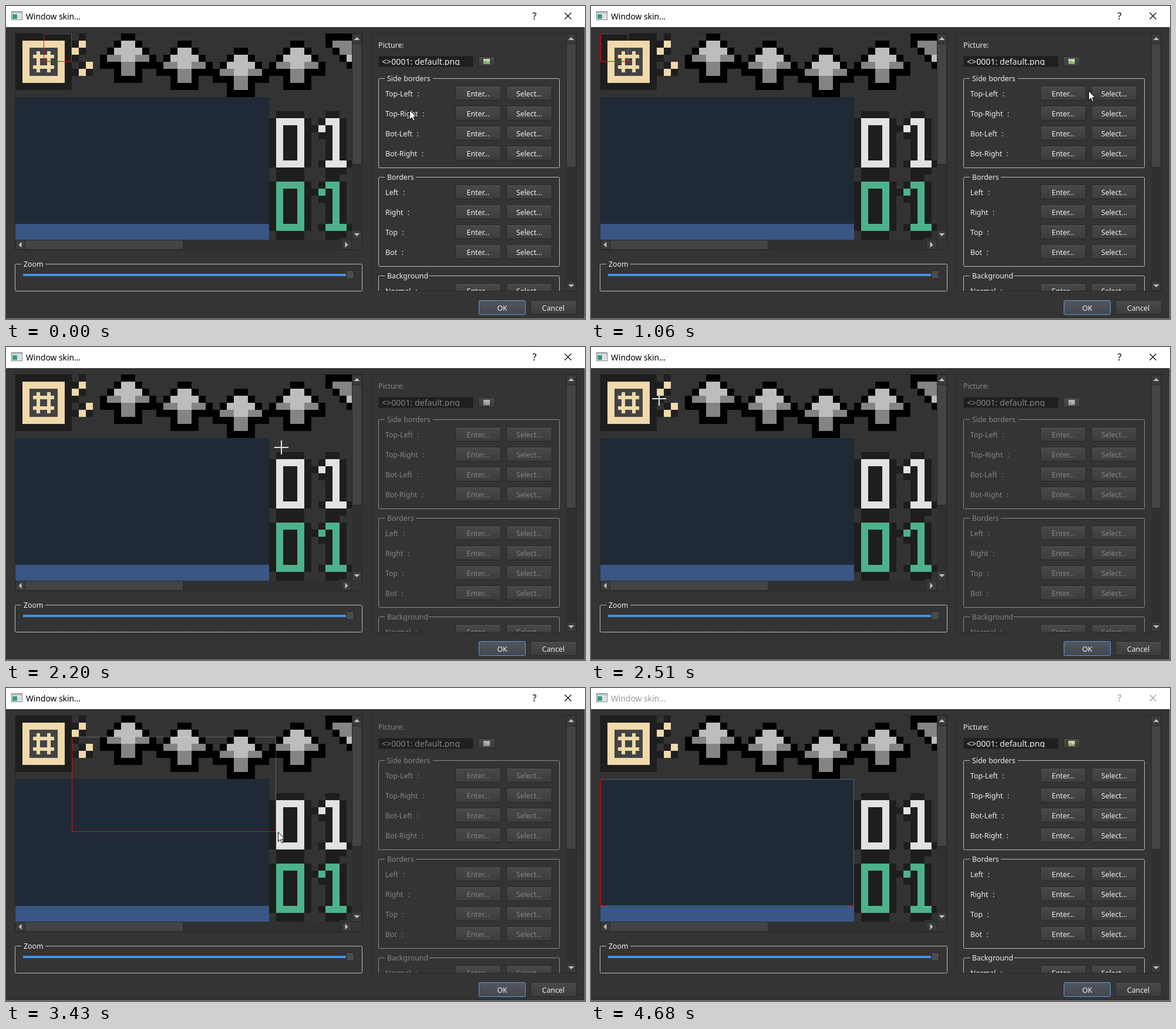
An HTML page for the animation above (4.74 s loop, 986 px wide and 533 px high).

```html
<!DOCTYPE html>
<html lang="en">
<head>
<meta charset="utf-8">
<title>Window skin</title>
<style>
html, body { margin: 0; width: 100%; height: 100%; overflow: hidden; background: #333; }
svg { display: block; width: 986px; height: 533px; }
text { font: 12.3px "Noto Sans", "Open Sans", sans-serif; fill: #f0f0f0; white-space: pre; word-spacing: .6px; }
.mid { text-anchor: middle; }
.box { fill: none; stroke: #bcbcbc; }
.off text { fill: #858585; }
.off .box { stroke: #8c8c8c; }
.off .leaf { fill: #b4b4b4; }
.off .land { fill: #9a9a9a; }
.leaf { fill: #c3dab0; }
.land { fill: #86ab72; }
#caption text { fill: #000; }
#caption path { stroke: #000; fill: none; }
#caption.idle text { fill: #999; }
#caption.idle path { stroke: #999; }
</style>
</head>
<body>
<svg id="stage" viewBox="0 0 986 533" xmlns="http://www.w3.org/2000/svg"></svg>
<script>
const LOOP = 4740, CELL = 12, DARK = '#1e1e1e';

const rect = (x, y, w, h, fill, more = '') =>
  `<rect x="${x}" y="${y}" width="${w}" height="${h}" fill="${fill}" ${more}/>`;
const label = (x, y, s, more = '') => `<text x="${x}" y="${y}" ${more}>${s}</text>`;
const frame = (x, y, w, h, fill, line, more = '') =>
  rect(x + .5, y + .5, w - 1, h - 1, fill, `stroke="${line}" ${more}`);

// Pixel art in cells, measured from the corner of the view
const cells = (c, r, w, h, fill) => rect(16 + c * CELL, 47 + r * CELL, w * CELL, h * CELL, fill);

function emblem() {
  const cream = '#f0d9ab';
  let s = cells(0, 0, 8, 8, DARK) + cells(1, 1, 6, 6, cream) + cells(2, 2, 4, 4, '#434343');
  for (const d of [0, 1.5]) {
    s += cells(3 + d, 2.5, .5, 3, cream) + cells(2.5, 3 + d, 3, .5, cream);
  }
  for (const [c, r] of [[9, 0], [8, 1], [9, 2], [8, 3], [9, 4], [8, 5], [10, 5]]) s += cells(c, r, 1, 1, DARK);
  for (const [c, r] of [[9, 1], [8, 2], [10, 4], [9, 5]]) s += cells(c, r, 1, 1, cream);
  return s;
}

function arrow(c, r) {
  const half = [1, 2, 3, 4, 4, 2, 2];
  const light = '#bdbdbd', gray = '#848484';
  return half.map((n, i) => cells(c - n, r + i, 2 * n, 1, '#000')).join('') +
    cells(c - 1, r + 1, 2, 1, light) + cells(c - 2, r + 2, 4, 1, light) +
    cells(c - 3, r + 3, 6, 1, gray) + cells(c - 1, r + 3, 2, 1, light) +
    cells(c - 1, r + 4, 2, 2, gray);
}

function sideArrow() {
  return cells(44, 0, 4, 2, '#000') + cells(45, 1, 3, 1, '#848484') +
    cells(45, 2, 1, 1, '#000') + cells(46, 2, 2, 1, '#848484') +
    cells(46, 3, 1, 1, '#000') + cells(47, 3, 1, 1, '#bdbdbd') + cells(47, 4, 1, 1, '#000');
}

function digits(r, ink) {
  return cells(37, r - 1, 4, 9, DARK) + cells(36, r, 6, 7, DARK) +
    cells(37, r, 4, 7, ink) + cells(38, r + 1, 2, 5, DARK) +
    cells(44, r - 1, 2, 1, DARK) + cells(43, r, 4, 3, DARK) + cells(42, r + 1, 1, 1, DARK) +
    cells(44, r + 3, 3, 3, DARK) + cells(43, r + 6, 5, 1, DARK) + cells(44, r + 7, 3, 1, DARK) +
    cells(44, r, 2, 1, ink) + cells(43, r + 1, 1, 1, ink) +
    cells(45, r + 1, 1, 5, ink) + cells(44, r + 6, 3, 1, ink);
}

const art = () => emblem() +
  [0, 1, 2, 1].map((r, i) => arrow(16 + 8 * i, r)).join('') + sideArrow() +
  cells(0, 9, 36, 18, '#202a37') + cells(0, 27, 36, 3, '#395685') +
  ['#e2e2e2', '#4db28c', '#e2e2e2'].map((ink, i) => digits(12 + 9 * i, ink)).join('');

// Widgets
const button = (x, y, w, h, id = '') =>
  frame(x, y, w, h, 'url(#face)', '#262626', `rx="2" ${id && `id="${id}"`}`) +
  rect(x + 2, y + 1, w - 4, 1, '#525252');
const tip = (x, y, turn) =>
  `<path d="M-5 2.5H5L0 -2.5Z" transform="translate(${x} ${y}) rotate(${turn})" fill="#c0c0c0"/>`;

function vScroll(x, top, bottom, end) {
  return rect(x, top, 17, bottom - top, '#303030') +
    frame(x, top, 17, 18, '#3b3b3b', '#282828') + frame(x, bottom - 17, 17, 17, '#3b3b3b', '#282828') +
    frame(x, top + 17, 17, end - top - 17, '#444', '#282828') +
    tip(x + 8.5, top + 8.5, 0) + tip(x + 8.5, bottom - 8.5, 180);
}

function hScroll() {
  return rect(16, 398, 590, 17, '#303030') +
    frame(16, 398, 17, 17, '#3b3b3b', '#282828') + frame(571, 398, 18, 17, '#3b3b3b', '#282828') +
    frame(32, 398, 270, 17, '#444', '#282828') + rect(589, 398, 17, 17, '#353535') +
    tip(24, 406.5, -90) + tip(580, 406.5, 90);
}

function group(x, y, w, h, title, gap) {
  return `<path class="box" d="M${x + 11} ${y + .5}H${x + 2.5}q-2 0 -2 2V${y + h - 2.5}q0 2 2 2` +
    `H${x + w - 2.5}q2 0 2 -2V${y + 2.5}q0 -2 -2 -2H${x + gap}"/>` + label(x + 15, y + 5, title);
}

function section(y, title, gap, names, h) {
  return group(634, y, 309, h, title, gap) + names.map((name, i) => {
    const m = y + 26 + 34 * i, top = y === 123 && !i;
    return label(646, m + 5, name + '  :') +
      button(765, m - 13, 78, 25, top ? 'enter' : '') + label(804, m + 5, 'Enter...', 'class="mid"') +
      button(852, m - 13, 78, 25, top ? 'select' : '') + label(891, m + 5, 'Select...', 'class="mid"');
  }).join('');
}

function zoom() {
  let s = group(15, 439, 592, 47, 'Zoom', 52) + rect(29, 456, 552, 4, '#4292e4');
  for (let i = 0; i < 11; i++) s += rect(36 + 55 * i, 469, 1, 4, '#252525');
  return s + frame(579, 450, 14, 15, '#4b4b4b', '#222', 'rx="2"');
}

const caption = () => rect(0, 0, 986, 36, '#fff') +
  frame(9, 9, 19, 15, '#f4f4f4', '#74808a') + rect(10, 10, 17, 3, '#b9c5d0') +
  rect(11, 14, 8, 8, '#379a7c') + rect(20, 14, 6, 8, '#d5dde3') +
  '<g id="caption">' + label(34, 23, 'Window skin...', 'style="font-size:13.8px;word-spacing:0"') +
  label(900, 23, '?', 'class="mid" style="font-size:16px"') +
  '<path d="M951.500 11.500L962.500 22.500M962.500 11.500L951.500 22.500" stroke-width="1.200"/></g>';

const stage = document.getElementById('stage');
stage.innerHTML = `
<defs>
  <linearGradient id="face" x2="0" y2="1"><stop stop-color="#494949"/><stop offset="1" stop-color="#3c3c3c"/></linearGradient>
  <linearGradient id="hover" x2="0" y2="1"><stop stop-color="#545454"/><stop offset="1" stop-color="#464646"/></linearGradient>
  <linearGradient id="main" x2="0" y2="1"><stop stop-color="#50565f"/><stop offset="1" stop-color="#434850"/></linearGradient>
  <clipPath id="view"><rect x="16" y="47" width="573" height="351"/></clipPath>
  <clipPath id="pane"><rect x="623" y="47" width="331" height="438"/></clipPath>
  <clipPath id="field"><rect x="636" y="86" width="158" height="15"/></clipPath>
</defs>
${rect(0, 0, 986, 533, '#343434')}${caption()}
${frame(15, 46, 592, 370, '#333', '#292929')}
<g clip-path="url(#view)"><g shape-rendering="crispEdges">${art()}</g>
  <path id="dim" fill="none" stroke="#fff" stroke-opacity=".25"/>
  <path id="red" fill="none" stroke="#f00"/></g>
${vScroll(589, 47, 398, 270)}${hScroll()}${zoom()}
${frame(622, 46, 350, 440, '#343434', '#292929')}
<g id="panel" clip-path="url(#pane)">
  ${label(634, 71, 'Picture:')}
  ${frame(634, 85, 162, 19, '#1f1f1f', '#292929')}
  <g clip-path="url(#field)">${label(640, 100, '&lt;&gt;0001: default.png', 'style="font-size:14.15px;word-spacing:0"')}</g>
  ${button(804, 86, 29, 17)}
  <rect class="leaf" x="813" y="90" width="11" height="9"/><path class="land" d="M813 99V95L817 93L820 96L824 94V99Z"/>
  ${section(123, 'Side borders', 93, ['Top-Left', 'Top-Right', 'Bot-Left', 'Bot-Right'], 153)}
  ${section(291, 'Borders', 64, ['Left', 'Right', 'Top', 'Bot'], 153)}
  ${section(459, 'Background', 86, ['Normal'], 60)}
</g>
${vScroll(954, 47, 485, 275)}
${button(805, 501, 80, 25, 'ok')}${label(845, 519, 'OK', 'class="mid"')}
${button(893, 501, 79, 25)}${label(932, 519, 'Cancel', 'class="mid"')}
${rect(985, 36, 1, 497, '#8c8c8c')}${rect(0, 532, 986, 1, '#8c8c8c')}
<path id="arrow" d="M.500 .500V16.500L4.200 13L6.800 18.700L9.200 17.600L6.700 12H11.500Z" fill="#fff" stroke="#000"/>
<path id="cross" d="M-12 0H12M0 -12V12" fill="none" stroke="#e0e0e0" stroke-width="2"/>`;

const el = id => document.getElementById(id);
const set = (id, name, value) => el(id).setAttribute(name, value);
const show = (id, on) => set(id, 'visibility', on ? 'visible' : 'hidden');

// Pointer and drag corner: time, x, y
const pointer = [
  [0, 687, 177], [110, 687, 177], [240, 688, 173], [510, 736, 160], [750, 790, 148], [840, 790, 148],
  [1050, 847, 144], [1170, 886, 149], [1410, 886, 149], [1590, 891, 153], [1950, 891, 153],
  [1951, 872, 151], [2130, 872, 151], [2160, 670, 168], [2190, 469, 171], [2310, 235, 130],
  [2430, 130, 94], [2510, 111, 86], [2660, 111, 86], [2910, 331, 166], [3060, 414, 214],
  [3170, 446, 235], [3200, 446, 235], [3420, 463, 245], [3780, 463, 245], [3930, 597, 400],
  [4050, 670, 462], [4170, 801, 512]
];
const corner = [[2660, 112, 83], [2910, 298, 149], [3060, 398, 208], [3180, 440, 232], [3420, 460, 245]];

function along(keys, t) {
  const i = keys.findIndex(k => k[0] > t);
  if (i < 0) return keys[keys.length - 1].slice(1);
  if (!i) return keys[0].slice(1);
  const a = keys[i - 1], b = keys[i], p = (t - a[0]) / (b[0] - a[0]);
  return [1, 2].map(n => Math.round(a[n] + (b[n] - a[n]) * p));
}

function selection(t, q, y) {
  if (t < 800 && y > 166) return [64, 47, 112, 95];
  if (t < 1600) return [16, 47, 64, 95];
  if (t < 2670) return null;
  return t < 4050 ? [112, 83, ...along(corner, q)] : [16, 155, 448, 371];
}

function draw(t) {
  const q = Math.floor(t / 30) * 30;
  const [x, y] = along(pointer, t >= 1960 && t < 1980 ? 1960 : q);
  const off = t >= 1600 && t < 3470;
  const seen = t < 110 || (t >= 250 && t < 4200);
  const cross = off && x < 589 && t < 3400;
  show('arrow', seen && !cross);
  show('cross', seen && cross);
  for (const id of ['arrow', 'cross']) set(id, 'transform', `translate(${x} ${y})`);

  const box = selection(t, q, y);
  show('red', box);
  show('dim', box);
  if (box) {
    const [l, u, r, d] = box;
    set('red', 'd', `M${l + .5} ${u}V${d - .5}H${r}`);
    set('dim', 'd', `M${l + 1} ${u + .5}H${r - .5}V${d - 1}`);
  }

  const pressed = t >= 1460 && t < 1600;
  const over = (a, b) => seen && !off && y > 136 && y < 162 && x >= a && x < b;
  set('enter', 'fill', over(765, 843) ? 'url(#hover)' : 'url(#face)');
  set('select', 'fill', pressed ? '#2e2e2e' : over(852, 930) ? 'url(#hover)' : 'url(#face)');
  set('ok', 'fill', pressed ? 'url(#face)' : 'url(#main)');
  set('ok', 'stroke', pressed ? '#262626' : '#5f9be0');
  set('panel', 'class', off ? 'off' : '');
  set('caption', 'class', t >= 4680 ? 'idle' : '');
}

const start = performance.now();
function tick() {
  draw((performance.now() - start) % LOOP);
  requestAnimationFrame(tick);
}
draw(0);
requestAnimationFrame(tick);
</script>
</body>
</html>
```
